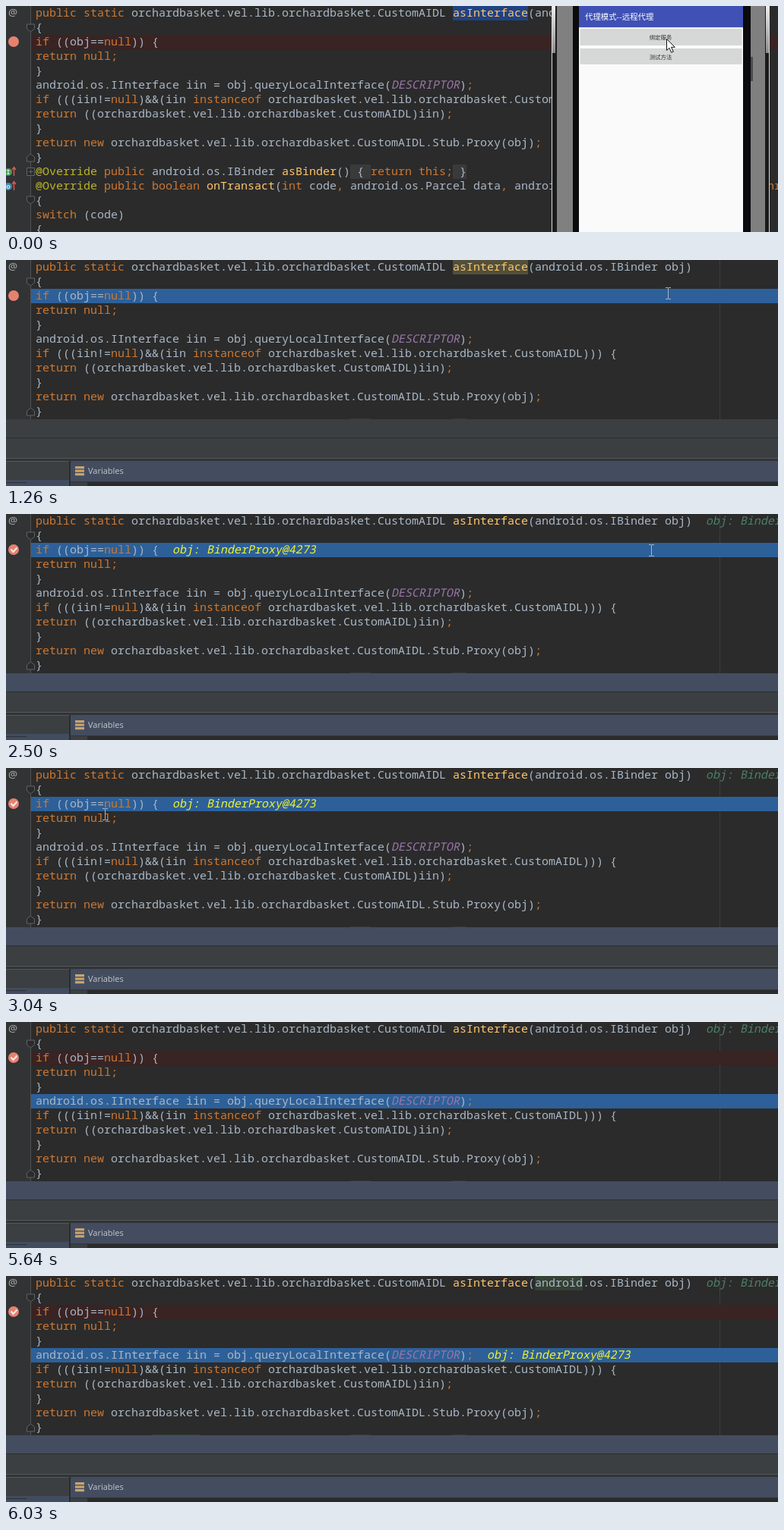
Write an HTML page that moves like this. It is 1016 px wide and 298 px high and loops after 8 s.

```html
<!DOCTYPE html>
<html lang="en">
<head>
<meta charset="utf-8">
<title>Debugger session</title>
<style>
  html, body { margin: 0; width: 100%; height: 100%; overflow: hidden; background: #2b2b2b; }
  svg { display: block; width: 1016px; height: 298px; }
  text { white-space: pre; }
  .code { font: 15px "Noto Sans Mono", "DejaVu Sans Mono", monospace; }
  .cjk { font-family: "Noto Sans CJK SC", "Noto Sans CJK", sans-serif; }
  .ui { font: 11px "Open Sans", "Noto Sans", sans-serif; }
</style>
</head>
<body>
<svg id="stage" viewBox="0 0 1016 298">
  <defs>
    <linearGradient id="glare" x1="0" y1="0" x2="0" y2="1">
      <stop offset="0" stop-color="#f0f0f0"/>
      <stop offset="1" stop-color="#8c8c8c"/>
    </linearGradient>
  </defs>
</svg>
<script>
const NS = 'http://www.w3.org/2000/svg';
const stage = document.getElementById('stage');
const ROW = 19, COL = 9, LEFT = 39, LOOP = 8000;
const PKG = 'orchardbasket.vel.lib.orchardbasket';

const SOURCE = [
  `public static ${PKG}.CustomAIDL asInterface(android.os.IBinder obj)`,
  '{',
  'if ((obj==null)) {',
  'return null;',
  '}',
  'android.os.IInterface iin = obj.queryLocalInterface(DESCRIPTOR);',
  `if (((iin!=null)&&(iin instanceof ${PKG}.CustomAIDL))) {`,
  `return ((${PKG}.CustomAIDL)iin);`,
  '}',
  `return new ${PKG}.CustomAIDL.Stub.Proxy(obj);`,
  '}',
  '@Override public android.os.IBinder asBinder() { return this; }',
  '@Override public boolean onTransact(int code, android.os.Parcel data, android.os.Parcel reply, int flags) throws',
  '{',
  'switch (code)',
  '{'
];

const STYLES = [
  [/^@/, '#bbb529'],
  [/^(public|static|if|null|return|instanceof|new|boolean|int|this|throws|switch|[;,])$/, '#cc7832'],
  [/^(asInterface|asBinder|onTransact)$/, '#ffc66d'],
  [/^DESCRIPTOR$/, '#9876aa']
];

function add(parent, tag, attrs = {}, content) {
  const el = document.createElementNS(NS, tag);
  for (const key in attrs) el.setAttribute(key, attrs[key]);
  if (content) el.textContent = content;
  parent.appendChild(el);
  return el;
}
const group = (parent = stage) => add(parent, 'g');
const rect = (parent, x, y, width, height, fill, more) =>
  add(parent, 'rect', { x, y, width, height, fill, ...more });
const path = (parent, d, stroke, fill = 'none', more) =>
  add(parent, 'path', { d, stroke, fill, ...more });
const show = (el, on) => el.setAttribute('visibility', on ? 'visible' : 'hidden');

const mark = (parent, row, col, chars, fill) =>
  rect(parent, LEFT + col * COL, row * ROW, chars * COL, ROW, fill);
const band = (row, fill) => rect(stage, 33, row * ROW, 983, ROW, fill);

// The monospace face has no italic cut, so italics are slanted here.
function place(el, row, col, italic) {
  const slant = italic ? ' skewX(-12)' : '';
  el.setAttribute('transform', `translate(${LEFT + col * COL} ${row * ROW + 14})${slant}`);
}
function code(row, col, str, fill, italic) {
  const el = add(stage, 'text', { class: 'code', fill }, str);
  place(el, row, col, italic);
  return el;
}

function drawLine(str, row) {
  for (const m of str.matchAll(/@?\w+|[;,]|[^\w;,@\s]+/g)) {
    const style = STYLES.find(([pattern]) => pattern.test(m[0]));
    code(row, m.index, m[0], style ? style[1] : '#a9b7c6', m[0] === 'DESCRIPTOR');
  }
}

// Editor background, gutter and row bands
rect(stage, 0, 0, 1016, 298, '#2b2b2b');
rect(stage, 0, 0, 33, 298, '#313335');
rect(stage, 939, 0, 1, 298, '#3b3d3f');
band(2, '#3a2323');
const execBand = band(2, '#2d6099');
mark(stage, 11, 46, 3, '#3a3a3a');
mark(stage, 11, 61, 2, '#3a3a3a');
const nameMark = mark(stage, 0, 61, 11, '#214283');
const typeMark = mark(stage, 0, 73, 7, '#344134');
const typeMarkBelow = mark(stage, 11, 17, 7, '#344134');
SOURCE.forEach(drawLine);

// Debugger value hints
const paramHint = code(0, 98, 'obj: BinderProxy@4273', '#4d7f68', true);
const valueHint = code(2, 20, 'obj: BinderProxy@4273', '#f2f22c', true);

// Fold markers
rect(stage, 32, 0, 1, 298, '#505254');
const fold = (y, dir) => path(stage,
  `M27.5 ${y - 5 * dir}h10v${6 * dir}l-5 ${4 * dir}l-5 ${-4 * dir}z`, '#606366', '#2b2b2b');
fold(29, 1);
fold(200, -1);
fold(256, 1);
path(stage, 'M27.5 213.5h10v10h-10z M29.5 218.5h6 M32.5 215.5v6', '#606366', '#2b2b2b');

// Gutter icons
add(stage, 'text', { x: 3, y: 13, fill: '#b4b6b8', 'font-size': 13.5, 'font-family': 'Open Sans, sans-serif' }, '@');
add(stage, 'circle', { cx: 10, cy: 47, r: 7, fill: '#e8806f' });
const check = path(stage, 'M6.5 46.5l3 3.5l5-5.5', '#f4ece8', 'none', { 'stroke-width': 2 });
[[218, '#4c9a55', 'I'], [237, '#4189ad', 'o']].forEach(([y, color, letter]) => {
  add(stage, 'circle', { cx: 3, cy: y + 1, r: 5, fill: color });
  add(stage, 'text', {
    x: 3, y: y + 4, fill: '#e4eaec', 'font-size': 9, 'font-weight': 700,
    'text-anchor': 'middle', 'font-family': 'Noto Sans Mono, monospace'
  }, letter);
  path(stage, `M10.5 ${y + 6}v-11 M8 ${y - 2}l2.5-3.5l2.5 3.5`, '#d9574f', 'none', { 'stroke-width': 1.5 });
});

// Phone emulator: window edges, grey casing, black bezel, screen
const phone = group();
rect(phone, 718, 0, 287, 298, '#1b1b1b');
[718, 1000].forEach(x => rect(phone, x, 0, 5, 62, 'url(#glare)'));
[718, 1004].forEach(x => rect(phone, x, 0, 1, 298, '#d8d8d8'));
rect(phone, 725, 0, 21, 298, '#808080');
rect(phone, 980, 0, 19, 298, '#808080');
rect(phone, 746, 0, 234, 298, '#0b0a0c');
rect(phone, 980, 67, 3, 32, '#4c4c50');
rect(phone, 754, 0, 216, 298, '#fafafa');
rect(phone, 754, 0, 216, 28, '#3f51b5');
rect(phone, 754, 28, 216, 1, '#dcdcde');
add(phone, 'text', { class: 'cjk', x: 762, y: 18, fill: '#fff', 'font-size': 10.4, 'font-weight': 500 }, '代理模式--远程代理');

function button(y, height, label) {
  const face = rect(phone, 755.5, y, 213, height, '#d6d7d7', { rx: 1 });
  add(phone, 'text', {
    class: 'cjk', x: 861.5, y: y + height / 2 + 3, fill: '#333',
    'font-size': 7.4, 'text-anchor': 'middle'
  }, label);
  return face;
}
const bindButton = button(30, 22, '绑定服务');
const pressShade = rect(phone, 755.5, 51.5, 213, 1, '#bcbdbd');
button(56, 21, '测试方法');
path(phone, 'M869.5 43.5v15l3.4-3.2l2.8 6l2.6-1.2l-2.8-5.8h4.8z', '#111', '#fff');

// Debug panel
const panel = group();
rect(panel, 0, 210, 1016, 88, '#3c3f41');
const panelHead = rect(panel, 0, 210, 1016, 25, '#3c3f41');
rect(panel, 0, 234, 1016, 1, '#2c2e30');
rect(panel, 0, 261, 1016, 1, '#55585a');
rect(panel, 0, 262, 1016, 3, '#313335');
rect(panel, 0, 265, 84, 1, '#55585a');
rect(panel, 0, 290, 84, 8, '#414c5f');
rect(panel, 0, 293, 27, 1, '#2d3037');
rect(panel, 83, 265, 2, 33, '#2b2d2f');
rect(panel, 85, 265, 931, 28, '#434d5f');
rect(panel, 85, 292, 931, 1, '#31353c');
rect(panel, 107, 293, 909, 5, '#2b2b2b');
[272, 276.5, 281].forEach(y => rect(panel, 91, y, 12, 3.2, '#c9a26d'));
add(panel, 'text', { class: 'ui', x: 108, y: 282, fill: '#c4c7ca' }, 'Variables');

const beam = path(stage, 'M-3.5-7.5h3l.5.5l.5-.5h3 M0-7v14 M-3.5 7.5h3l.5-.5l.5.5h3', '#a9b5c0');

// Pointer stops: [time, x, y]
const STOPS = [
  [1260, 871.5, 44], [2500, 849.5, 48], [2620, 730.5, 62], [2740, 542.5, 82],
  [2900, 203.5, 68], [3040, 130.5, 61], [3470, 117.5, 93]
];

function render(t) {
  const debugging = t >= 1260, attached = t >= 1400, stepped = t >= 5640;
  show(phone, !debugging);
  show(panel, debugging);

  const pressed = t >= 720;
  bindButton.setAttribute('fill', pressed ? '#d2d3d3' : '#d6d7d7');
  show(pressShade, pressed && !debugging);

  show(execBand, debugging);
  execBand.setAttribute('y', (stepped ? 5 : 2) * ROW);
  show(nameMark, !attached);
  nameMark.setAttribute('fill', debugging ? '#52503a' : '#214283');
  panelHead.setAttribute('fill', attached ? '#434d5f' : '#3c3f41');
  show(check, t >= 1520);

  show(paramHint, t >= 1670);
  show(valueHint, t >= 1670 && !(stepped && t < 5760));
  place(valueHint, stepped ? 5 : 2, stepped ? 66 : 20, true);
  show(typeMark, t >= 5880);
  show(typeMarkBelow, t >= 6030);

  const stop = STOPS.filter(([time]) => time <= t).pop();
  show(beam, stop && t < 3590);
  if (stop) beam.setAttribute('transform', `translate(${stop[1]} ${stop[2]})`);
}

const start = performance.now();
function tick() {
  render((performance.now() - start) % LOOP);
  requestAnimationFrame(tick);
}
render(0);
requestAnimationFrame(tick);
</script>
</body>
</html>
```
